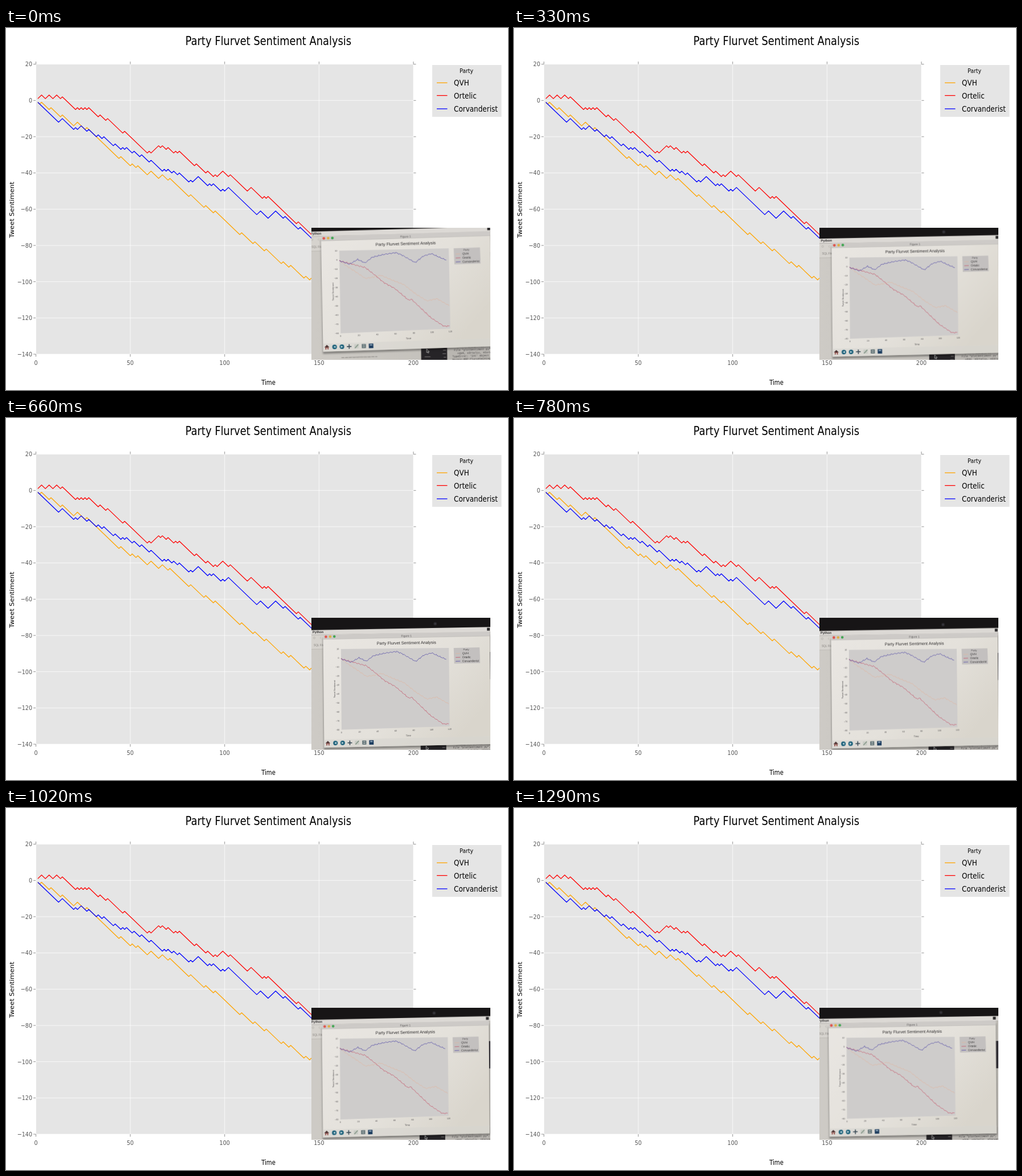
Animation of 881x636 px, one loop 1320 ms. Source, as an HTML page:

```html
<!DOCTYPE html>
<html lang="en">
<head>
<meta charset="utf-8">
<title>Party Sentiment Analysis</title>
<style>
html, body { margin: 0; width: 100%; height: 100%; overflow: hidden; background: #fff; }
svg { display: block; width: 881px; height: 636px; }
#chart { font-family: "DejaVu Sans", sans-serif; }
#photo { font-family: "Liberation Sans", Arial, sans-serif; }
.walk { fill: none; stroke-width: 1.3; stroke-linejoin: round; }
.mono { font: 4.6px "Liberation Mono", "DejaVu Sans Mono", monospace; white-space: pre; }

/* hand-held camera drift, 30 ms per step */
#photo {
  transform-box: view-box;
  transform-origin: 690px 475px;
  animation: drift 1320ms infinite;
}
@keyframes drift {
  0%       { transform: matrix(1.014, -.011, .01, 1.022, -1, -12.3); animation-timing-function: steps(3); }
  6.8182%  { transform: matrix(1.01, -.008, .006, 1.015, .2, -7.5); animation-timing-function: steps(3); }
  13.6364% { transform: matrix(1.006, -.006, .003, 1.01, 1, -4); animation-timing-function: steps(5); }
  25%      { transform: matrix(1, -.002, 0, 1.004, .7, -.6); animation-timing-function: steps(6); }
  38.6364% { transform: matrix(1, 0, 0, 1, 0, 0); animation-timing-function: steps(9); }
  59.0909% { transform: matrix(.998, .001, 0, .999, -.4, 3.3); animation-timing-function: steps(8); }
  77.2727% { transform: matrix(1, -.003, 0, 1, -2.2, 1); animation-timing-function: steps(9); }
  97.7273%, 100% { transform: matrix(1.002, .002, 0, 1.002, -4.3, 0); }
}
</style>
</head>
<body>
<svg viewBox="0 0 881 636" xmlns="http://www.w3.org/2000/svg">
  <defs>
    <clipPath id="frame"><rect x="536.5" y="351" width="313.3" height="232"/></clipPath>
    <linearGradient id="paper" x2="1" y2=".6">
      <stop offset="0" stop-color="#e9e6e2"/>
      <stop offset=".6" stop-color="#e4e1db"/>
      <stop offset="1" stop-color="#d9d5cc"/>
    </linearGradient>
    <linearGradient id="desk" x2="1">
      <stop offset="0" stop-color="#cfccc7"/>
      <stop offset="1" stop-color="#bdbab4"/>
    </linearGradient>
    <filter id="soft" x="-10%" y="-10%" width="120%" height="120%"><feGaussianBlur stdDeviation="1.6"/></filter>
  </defs>

  <g id="chart">
    <rect x="52.5" y="63.6" width="662.5" height="509.4" fill="#e5e5e5"/>
    <g id="grid"></g>
    <g id="walks"></g>
    <rect x="748" y="65" width="121.5" height="91" fill="#e5e5e5"/>
  </g>

  <g clip-path="url(#frame)">
    <g id="photo">
      <!-- desk and background windows -->
      <path d="M500 340H900V640H500Z" fill="url(#desk)"/>
      <path d="M500 380L560 378V404L500 405Z" fill="#d6d3ce"/>
      <path d="M500 405.3L560 404" stroke="#b5b2ad" stroke-width=".7"/>
      <circle cx="541" cy="384.5" r="1.6" fill="none" stroke="#a9a6a2" stroke-width=".6"/>
      <path d="M553 382.5l-1.6 2 1.6 2" fill="none" stroke="#a9a6a2" stroke-width=".6"/>
      <text x="540" y="399" font-size="4.8" fill="#85827e">SQL File</text>
      <path d="M846 409H900V457H846Z" fill="#37343a"/>
      <path d="M590 588q30-1 62-1" stroke="#9c9995" stroke-width="1.5" stroke-dasharray="5 1.5"/>
      <path d="M728 560H776V640H728Z" fill="#262427"/>
      <path d="M773 560H900V640H773Z" fill="#b9b6b1"/>
      <g id="term" fill="#3d3b3c" class="mono"></g>
      <g fill="none" stroke="#8f8c8c" stroke-width=".8">
        <path d="M766 577h5M765 583h6M767 589h4M734 588h10M735 594h7"/>
      </g>

      <!-- bezel and menu bar -->
      <path d="M500 372L900 364V373L500 380Z" fill="#dcd9d5"/>
      <path d="M500 380L900 373" stroke="#a8a5a2" stroke-width=".7"/>
      <path d="M500 300H900V364.3L500 371.5Z" fill="#171516"/>
      <circle cx="753.5" cy="359.5" r="3" fill="#2a282b"/>
      <circle cx="753.5" cy="359.5" r="1.2" fill="#3c3c46"/>
      <text x="538" y="376.2" font-size="5.7" font-weight="bold" fill="#2b2a2b" transform="rotate(-.8 538 376)">Python</text>
      <rect x="844.5" y="366.6" width="5" height="5" fill="#2b2a2b"/>

      <!-- figure window -->
      <path d="M556 384L850 378L852 574L558 581Z" fill="#000" opacity=".35" filter="url(#soft)"/>
      <path d="M556.5 382q0-3 3-3L847 373.2q2.5 0 2.5 3L851 571.2L558.5 577.5Z" fill="url(#paper)"/>
      <path d="M556.5 382q0-3 3-3L847 373.2q2.5 0 2.5 3V381L556.6 387Z" fill="#cdcac7"/>
      <path d="M556.6 387L849.5 381" stroke="#b3b0ad" stroke-width=".5"/>
      <path d="M558.3 563.5L850.8 557.5L851 571.2L558.5 577.5Z" fill="#d8d5d0" opacity=".6"/>
      <circle cx="561.5" cy="382.5" r="2.3" fill="#e0524c"/>
      <circle cx="569" cy="382.3" r="2.3" fill="#dfae45"/>
      <circle cx="576.3" cy="382.1" r="2.3" fill="#42a653"/>
      <path id="axes" fill="#cecccb"/>
      <g id="curves"></g>
      <path d="M786 402L831.5 401L832.5 428.6L787 429.6Z" fill="#c3c0bf"/>
      <g id="labels"></g>

      <!-- toolbar -->
      <g transform="translate(565 569.6) rotate(-1.1)">
        <path d="M-4.3 .3L0-4L4.3 .3Z" fill="#4a3030"/>
        <path d="M-2.8 .3H2.8V4H.9V1.4H-.9V4H-2.8Z" fill="#96504a"/>
        <circle cx="13.3" r="4" fill="#20637c"/>
        <circle cx="26" r="4" fill="#20637c"/>
        <path d="M15 -1.8L11.4 0L15 1.8ZM24.3 -1.8L27.9 0L24.3 1.8Z" fill="#cfe2e6"/>
        <path d="M38.6-4V4M34.6 0H42.6" stroke="#30424f" stroke-width="1.5"/>
        <path d="M47.5-3.5H55V3.5H47.5Z" fill="#c9ccc5"/>
        <path d="M48.5 3L54.5-3.2" stroke="#7d9080" stroke-width="1.4"/>
        <path d="M60.5-3.5H67.5V3.5H60.5Z" fill="#56686c"/>
        <path d="M62-1.5H66M62 1.3H66" stroke="#d5dad8" stroke-width="1"/>
        <rect x="72.6" y="-3.8" width="7.8" height="7.8" fill="#1c3c5e"/>
        <path d="M74.3-2.6H78.6V-.5H74.3Z" fill="#8ea6ba"/>
      </g>
      <path d="M737.6 574.8v6l1.5-1.3 1 2.3 1-.5-1-2.1h1.9Z" fill="#111" stroke="#eee" stroke-width=".6"/>
    </g>
  </g>
</svg>
<script>
const $ = id => document.getElementById(id);

function add(parent, tag, attrs, text) {
  const el = document.createElementNS('http://www.w3.org/2000/svg', tag);
  for (const k in attrs) el.setAttribute(k, attrs[k]);
  if (text !== undefined) el.textContent = text;
  parent.appendChild(el);
  return el;
}
const minus = n => String(n).replace('-', '\u2212');
const parties = ['QVH', 'Ortelic', 'Corvanderist'];
const title = 'Party Flurvet Sentiment Analysis';

/* main chart: the figure is narrowed as a whole, letters included */
const NARROW = .855;
const X = t => 52.5 + t * 3.3125;
const Y = v => 127.3 - v * 3.184;

function label(text, x, y, size, anchor = 'middle', fill = '#000', turn = 0) {
  add($('chart'), 'text', {
    'font-size': size, 'text-anchor': anchor, fill,
    transform: `translate(${x} ${y}) scale(${NARROW} 1) rotate(${turn})`
  }, text);
}
function grid(line, ticks) {
  add($('grid'), 'path', { d: line, stroke: '#fff', 'stroke-width': 1, opacity: .75 });
  add($('grid'), 'path', { d: ticks, stroke: '#777', 'stroke-width': .8 });
}

for (let v = -140; v <= 20; v += 20) {
  const y = Y(v);
  grid(`M52.5 ${y}H715`, `M48 ${y}H52.5M715 ${y}H719.5`);
  label(minus(v), 46, y + 3.8, 11.2, 'end', '#555');
}
for (let t = 0; t <= 200; t += 50) {
  const x = X(t);
  grid(`M${x} 63.6V573`, `M${x} 59V63.6M${x} 573V577.5`);
  label(t, x, 592.3, 11.2, 'middle', '#555');
}
label(title, 460.5, 29.5, 20.9);
label('Time', 460.5, 627, 11.8);
label('Tweet Sentiment', 14.2, 319.5, 11.8, 'middle', '#000', -90);
label('Party', 808, 79.3, 11);

const colors = ['#ffa500', '#ff0000', '#0000ff'];
parties.forEach((name, i) => {
  const y = [96.3, 118.6, 142][i];
  add($('chart'), 'path', { d: `M756 ${y}H774.5`, stroke: colors[i], 'stroke-width': 1.3 });
  label(name, 786, y + 5, 14.05, 'start');
});

/* unit-step walks given as lengths of alternating runs */
function walk(start, dir, runs, color) {
  let t = 1, v = start, d = `M${X(t)} ${Y(v)}`;
  for (const n of runs) {
    t += n;
    v += dir * n;
    dir = -dir;
    d += `L${X(t)} ${Y(v)}`;
  }
  add($('walks'), 'path', { d, class: 'walk', stroke: color });
}
walk(-1, -1, [1, 1, 4, 1, 5, 1, 6, 2, 4, 1, 17, 1, 5, 1, 2, 1, 5, 2, 4, 2, 3, 1, 10, 1, 7,
  1, 4, 1, 13, 1, 6, 1, 5, 1, 8, 1, 3, 1, 7, 1, 2, 2], colors[0]);
walk(1, 1, [2, 2, 2, 2, 2, 2, 1, 7, 1, 1, 1, 1, 1, 1, 1, 5, 1, 3, 1, 8, 1, 12, 1, 1, 4, 1,
  1, 2, 1, 3, 1, 1, 1, 8, 1, 5, 1, 3, 1, 1, 3, 3, 1, 9, 2, 6, 1, 1, 1, 15, 1, 8], colors[1]);
walk(-1, -1, [11, 2, 6, 1, 1, 2, 3, 1, 4, 1, 2, 1, 5, 1, 3, 1, 1, 1, 3, 1, 3, 1, 4, 1, 6, 1,
  1, 1, 2, 1, 2, 1, 5, 1, 1, 3, 5, 1, 1, 1, 4, 1, 1, 2, 15, 2, 4, 4, 4, 1, 7, 1, 8], colors[2]);

/* chart on the photographed screen, seen slightly askew */
function at(t, v) {
  const u = t / 120, w = (10 - v) / 90;
  return [588 + u * 189.5 + w * (1 + u * .5), 404 - 2 * u + w * (142 - 4 * u)];
}
$('axes').setAttribute('d', `M${at(0, 10)}L${at(120, 10)}L${at(120, -80)}L${at(0, -80)}Z`);

function small(text, x, y, size, anchor = 'middle', turn = -1, fill = '#4b494a') {
  add($('labels'), 'text', {
    'font-size': size, 'text-anchor': anchor, fill,
    transform: `translate(${x} ${y}) rotate(${turn})`
  }, text);
}
for (let v = -80; v <= 10; v += 10) {
  const [x, y] = at(0, v);
  small(minus(v), x - 3.5, y + 1.3, 3.7, 'end');
}
for (let t = 0; t <= 120; t += 20) {
  const [x, y] = at(t, -80);
  small(t, x, y + 6, 3.7);
}
small('Figure 1', 703, 382.6, 5.1, 'middle', -1, '#5d5b5b');
small(title, 703, 395.6, 7.25, 'middle', -1, '#2c2a2b');
small('Time', 706.5, 557.5, 4.2, 'middle', -1.5);
small('Tweet Sentiment', 578, 474.5, 4.2, 'middle', -90);
small('Party', 808, 406.3, 4.4);

function curve(knots, color, seed) {
  const pts = [];
  let k = 0;
  for (let t = 0; t <= knots[knots.length - 1][0]; t++) {
    while (t > knots[k + 1][0]) k++;
    const [t0, v0] = knots[k], [t1, v1] = knots[k + 1];
    const jitter = .9 * Math.sin(t * 2.3 + seed) * Math.sin(t * .7 + seed);
    pts.push(at(t, v0 + (v1 - v0) * (t - t0) / (t1 - t0) + jitter));
  }
  add($('curves'), 'path', {
    d: 'M' + pts.join('L'), fill: 'none', stroke: color, 'stroke-width': .75, 'stroke-linejoin': 'round'
  });
}
const faded = ['#dfb6a2', '#c4566a', '#5149a6'];
curve([[0, -1], [8, -7], [17, -13], [28, -21], [36, -20], [45, -18], [58, -24], [70, -29],
  [83, -40], [95, -48], [106, -46], [119, -54]], faded[0], 1);
curve([[0, -1], [14, -5], [24, -8], [28, -9], [39, -18], [48, -26], [60, -33], [75, -46.5],
  [78, -45.5], [99, -67], [113, -77], [119, -77]], faded[1], 2);
curve([[0, -1], [11, -5], [20, 0], [28, -4], [36, 2], [45, 4], [50, 5], [62, 6.5], [68, 4],
  [83, -5], [92, 2], [101, 4.5], [110, 0], [117, -3]], faded[2], 3);

parties.forEach((name, i) => {
  const y = 411.6 + i * 6.8;
  add($('labels'), 'path', { d: `M789.5 ${y + .3}L797.5 ${y}`, stroke: faded[i], 'stroke-width': .8 });
  small(name, 801, y + 1.7, 5.2, 'start', -1, '#363435');
});

[
  [790, 572.8, '_main_ analysis()'],
  [785, 578.6, 'File "plotSentiment.py", li'],
  [791, 584, 'nQVH, nOrtelic, nCorvande'],
  [782, 589.4, "TypeError: 'int' object is n"],
  [782, 594.8, 'Morens-MBP:flurvetmining_a']
].forEach(([x, y, line]) =>
  add($('term'), 'text', { transform: `translate(${x} ${y}) rotate(-1.2)` }, line));
</script>
</body>
</html>
```
